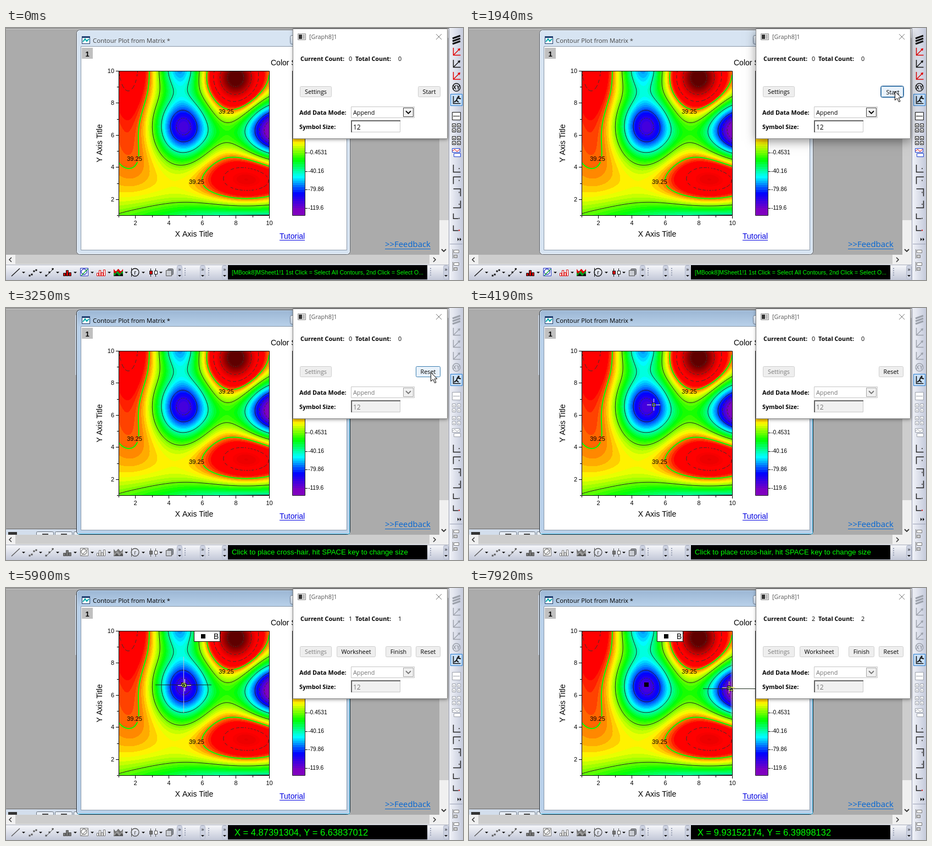
An HTML page with a canvas that plays this animation: 832 by 459 pixels, repeating every 8000 ms.

```html
<!DOCTYPE html>
<html lang="en">
<head>
<meta charset="utf-8">
<title>Contour picking</title>
<style>
html, body { margin: 0; width: 100%; height: 100%; overflow: hidden; background: #ababab; }
canvas { display: block; }
</style>
</head>
<body>
<canvas id="stage" width="832" height="459"></canvas>
<script>
const LOOP = 8000;
const ctx = document.getElementById('stage').getContext('2d');
const UI = '"Open Sans", "Noto Sans", sans-serif';
const ARIAL = '"Liberation Sans", Arial, sans-serif';
const clamp = (v, lo, hi) => Math.min(hi, Math.max(lo, v));

// ---------- drawing helpers ----------
function rect(x, y, w, h, fill, stroke, radius = 0) {
  const inset = stroke ? 0.5 : 0;
  ctx.beginPath();
  ctx.roundRect(x + inset, y + inset, w - 2 * inset, h - 2 * inset, radius);
  if (fill) { ctx.fillStyle = fill; ctx.fill(); }
  if (stroke) { ctx.strokeStyle = stroke; ctx.lineWidth = 1; ctx.stroke(); }
}
function path(p) {
  ctx.beginPath();
  for (let i = 0; i < p.length; i += 2) ctx.lineTo(p[i], p[i + 1]);
}
function line(color, width, ...p) {
  path(p);
  ctx.strokeStyle = color;
  ctx.lineWidth = width;
  ctx.stroke();
}
function poly(fill, ...p) {
  path(p);
  ctx.fillStyle = fill;
  ctx.fill();
}
function circle(x, y, r, color) {
  ctx.beginPath();
  ctx.arc(x, y, r, 0, 7);
  ctx.strokeStyle = color;
  ctx.lineWidth = 1.3;
  ctx.stroke();
}
const dot = (color, size, x, y) => rect(x - size / 2, y - size / 2, size, size, color);
const chevron = (color, x, y, r) => line(color, 1.8, x - r, y - r / 2, x, y + r / 2, x + r, y - r / 2);
function text(str, x, y, size, color = '#000', font = UI, align = 'left', weight = '') {
  ctx.font = `${weight} ${size}px ${font}`;
  ctx.textAlign = align;
  ctx.fillStyle = color;
  ctx.fillText(str, x, y);
}
function gradient(x0, y0, x1, y1, from, to) {
  const g = ctx.createLinearGradient(x0, y0, x1, y1);
  g.addColorStop(0, from);
  g.addColorStop(1, to);
  return g;
}

// ---------- contour plot ----------
const PLOT = { x: 205, y: 78, w: 274, h: 263 };
const LEVEL_STEP = 39.7, LEVEL_BASE = -0.4531;
const axisX = v => PLOT.x + (v - 1) / 9 * PLOT.w;
const axisY = v => PLOT.y + (10 - v) / 9 * PLOT.h;

// Smooth hills and pits in axis units: height, centre, spread.
const bump = (h, x, y, sx, sy) => ({ h, x, y, sx, sy });
const bumps = [
  bump(-130, 4.85, 6.5, 1.6, 1.9),
  bump(-170, 10.5, 6.3, 1.85, 1.7),
  bump(-88, 4.65, 10.3, 1.2, 1.7),
  bump(155, 8, 9.55, 1.4, 1.6),
  bump(70, 1.6, 10.3, 1.27, 3.3),
  bump(86, 8.7, 3.25, 2.35, 1.38),
  bump(19, 1.7, 4.9, 1.8, 2.4),
  bump(-15, 7.4, 6.1, 1.5, 1),
  bump(-78, 9, 0.5, 8, 1.38)
];
function field(px, py) {
  const x = 1 + px / PLOT.w * 9, y = 10 - py / PLOT.h * 9;
  return bumps.reduce((sum, b) =>
    sum + b.h * Math.exp(-(((x - b.x) / b.sx) ** 2) - ((y - b.y) / b.sy) ** 2), 22);
}

// Evenly spaced rainbow from purple to dark red.
const rainbow = [[128, 0, 192], [0, 0, 255], [0, 255, 255], [0, 255, 0], [255, 255, 0],
  [255, 0, 0], [255, 0, 0], [190, 0, 0], [95, 0, 0]];
function colorOf(value) {
  const band = LEVEL_STEP / 8;
  const v = LEVEL_BASE + (Math.floor((value - LEVEL_BASE) / band) + 0.5) * band;
  const k = clamp((v + 124) / 36, 0, rainbow.length - 1.001), i = Math.floor(k);
  return rainbow[i].map((c, n) => Math.round(c + (rainbow[i + 1][n] - c) * (k - i)));
}

const contourLabels = [[234, 238], [347, 280], [401, 152]];
const nearLabel = (x, y) =>
  contourLabels.some(([lx, ly]) => Math.abs(x - lx) < 14 && Math.abs(y - ly) < 6);

// Dashes follow the angle around the nearest hill or pit.
function inDash(x, y) {
  const offsets = bumps.map(b => [x - axisX(b.x), y - axisY(b.y)]);
  const [dx, dy] = offsets.reduce((a, b) => Math.hypot(...b) < Math.hypot(...a) ? b : a);
  return Math.sin(Math.atan2(dy, dx) * 24) > -0.4;
}

function makePlot() {
  const cv = document.createElement('canvas');
  cv.width = PLOT.w;
  cv.height = PLOT.h;
  const c = cv.getContext('2d');
  const img = c.createImageData(PLOT.w, PLOT.h);
  for (let y = 0, k = 0; y < PLOT.h; y++)
    for (let x = 0; x < PLOT.w; x++, k += 4)
      img.data.set([...colorOf(field(x, y)), 255], k);
  c.putImageData(img, 0, 0);

  const cell = 2, cols = PLOT.w / cell, rows = Math.ceil(PLOT.h / cell);
  const z = Array.from({ length: rows + 1 }, (_, r) =>
    Array.from({ length: cols + 1 }, (_, q) => field(q * cell, r * cell)));

  function contour(level, color, width, skip) {
    c.beginPath();
    for (let r = 0; r < rows; r++) for (let q = 0; q < cols; q++) {
      const x = q * cell, y = r * cell;
      const corners = [[x, y, z[r][q]], [x + cell, y, z[r][q + 1]],
        [x + cell, y + cell, z[r + 1][q + 1]], [x, y + cell, z[r + 1][q]]];
      const hits = [];
      corners.forEach((a, i) => {
        const b = corners[(i + 1) % 4];
        if ((a[2] < level) === (b[2] < level)) return;
        const t = (level - a[2]) / (b[2] - a[2]);
        hits.push([a[0] + (b[0] - a[0]) * t, a[1] + (b[1] - a[1]) * t]);
      });
      if (!hits.length || skip && skip(x + PLOT.x, y + PLOT.y)) continue;
      hits.forEach((h, i) => i % 2 ? c.lineTo(...h) : c.moveTo(...h));
    }
    c.strokeStyle = color;
    c.lineWidth = width;
    c.stroke();
  }
  const level = n => LEVEL_BASE + n * LEVEL_STEP;
  for (let n = -2; n <= 0; n++) contour(level(n), '#222', 1);
  for (const n of [-3, -2.5, 2, 3, 4]) contour(level(n), '#40302c', 1, (x, y) => !inDash(x, y));
  contour(level(1), '#00ff00', 2, nearLabel);
  return cv;
}
const plot = makePlot();

function drawGraph(s) {
  rect(138, 36, 20, 20, '#c0c0c0');
  text('1', 148, 52, 13, '#000', ARIAL, 'center', 'bold');
  ctx.drawImage(plot, PLOT.x, PLOT.y);
  rect(PLOT.x, PLOT.y, PLOT.w + 1, PLOT.h + 1, null, '#000');
  for (let v = 1; v <= 10; v++) {
    const x = Math.round(axisX(v)) + 0.5, y = Math.round(axisY(v)) + 0.5;
    const len = v % 2 ? 3 : 5;
    line('#000', 1, x, 342, x, 342 + len);
    line('#000', 1, 205, y, 205 - len, y);
    if (v % 2) continue;
    text(v, x, 359, 11, '#000', ARIAL, 'center');
    text(v, 197, y + 3, 11, '#000', ARIAL, 'right');
  }
  for (const [x, y] of contourLabels) text('39.25', x, y + 4, 11, '#000', ARIAL, 'center');
  text('X Axis Title', 342.5, 380, 14, '#000', ARIAL, 'center');
  ctx.save();
  ctx.translate(175, 210);
  ctx.rotate(-Math.PI / 2);
  text('Y Axis Title', 0, 0, 14, '#000', ARIAL, 'center');
  ctx.restore();

  text('Color Scale', 482, 68, 14, '#000', ARIAL);
  for (let y = 78; y < 341; y++) rect(521, y, 24, 1, `rgb(${colorOf(LEVEL_BASE + (227 - y) / 33.5 * LEVEL_STEP)})`);
  rect(521, 78, 24, 264, null, '#222');
  ['-0.4531', '-40.16', '-79.86', '-119.6'].forEach((label, i) => {
    const y = Math.round(227 + i * 33.6);
    line('#000', 1, 545, y + 0.5, 549, y + 0.5);
    text(label, 550, y + 3, 10.2, '#000', ARIAL);
  });
  text('Tutorial', 498, 384, 14, '#0000e0', ARIAL);
  line('#0000e0', 1, 498, 386.5, 544, 386.5);

  if (s.count) {
    rect(342, 78, 48, 20, '#fff', '#000');
    dot('#000', 8, 359, 88);
    text('B', 378, 93, 14, '#000', ARIAL);
    dot('#000', 8, 323, 176);
  }
  if (s.count > 1) dot('#000', 8, 477, 184);
  if (s.hair) drawHair(...s.hair);
}

function drawHair(x, y) {
  line('#1c2b1c', 1, x - 51, y + 0.5, x + 51, y + 0.5);
  line('#b9c4cc', 1, x + 0.5, y - 51, x + 0.5, y + 51);
  rect(x - 3, y - 3, 7, 7, null, '#d8e060');
  line('#111', 1, x - 2, y - 2, x + 3, y + 3);
  line('#111', 1, x - 2, y + 3, x + 3, y - 2);
}

// ---------- windows ----------
function drawGraphWindow(s) {
  if (s.active) {
    rect(-4, 402, 140, 14, '#d3deec', '#666', 5);
    rect(4, 408, 16, 6, '#333');
    for (let x = 55; x < 130; x += 34) {
      rect(x, 407, 32, 9, '#e8eef6', '#68717d', 2);
      line('#444', 2, x + 11, 412, x + 22, 412);
    }
    rect(126, 13, 6, 109, '#c3cedb');
  }
  rect(128, 3, 499, 410, s.active ? gradient(0, 3, 0, 34, '#9ab5d3', '#b9d1ea') : '#d7e4f2',
    s.active ? '#1f2833' : '#5b626b', 6);
  rect(129, 4, 497, 408, null, s.active ? '#dcebf9' : '#f2f7fc', 5);
  if (s.active) line('#4fc6ee', 1, 625.5, 10, 625.5, 411.5, 130, 411.5);
  rect(517, 13, 30, 17, gradient(0, 13, 0, 30, '#f6f9fd', '#c5d5e7'), '#6b7c92', 3);
  rect(138, 15, 15, 14, '#1d3d70');
  rect(139, 18, 13, 10, '#f4fbff');
  line('#0aa', 2, 140, 25, 144, 20, 147, 24, 151, 20);
  text('Contour Plot from Matrix *', 158, 27, 11.3, s.active ? '#000' : '#444');
  rect(136, 33, 485, 372, '#fff', '#8897a8');
  drawGraph(s);
}

function button(label, x, w, { hover, down, disabled } = {}) {
  rect(x, 106, w, 20, hover ? '#e9f2fb' : '#eeeeee', hover ? '#3c7fb1' : '#cfcfcf', 2);
  if (down) rect(x - 1, 105, w + 2, 22, null, '#3c6ea0', 3);
  const shift = down ? 1 : 0;
  text(label, x + w / 2 + shift, 120 + shift, 10.8, disabled ? '#7c7c7c' : '#000', UI, 'center');
}

function drawDialog(s) {
  ctx.save();
  ctx.shadowColor = 'rgba(0,0,0,.45)';
  ctx.shadowBlur = s.dialogActive ? 18 : 6;
  ctx.shadowOffsetY = s.dialogActive ? 4 : 1;
  rect(523, 1, 281, 201, '#fff');
  ctx.restore();
  rect(522, 1, 282, 201, '#fff', '#8a8a8a');
  rect(531, 10, 15, 12, '#f4f4f4', '#888');
  rect(533, 12, 6, 8, '#333');
  rect(540, 12, 4, 8, '#bbb');
  text('[Graph8]1', 552, 20, 10.8, '#555');
  line('#777', 1, 783, 11, 793, 21);
  line('#777', 1, 783, 21, 793, 11);

  const bold = (str, x, y) => text(str, x, y, 10.8, '#000', UI, 'left', 'bold');
  bold('Current Count:', 536, 60);
  bold('Total Count:', 636, 60);
  for (const x of [627, 717]) text(s.count, x, 60, 10.8, '#000', UI, 'center');

  button('Settings', 535, 58, { disabled: s.picking });
  if (s.count) {
    button('Worksheet', 602, 71);
    button('Finish', 691, 47);
  }
  if (s.picking) button('Reset', 746, 45, s);
  else button('Start', 750, 41, s);

  const ink = s.picking ? '#757575' : '#000';
  bold('Add Data Mode:', 534, 158);
  rect(628, 143, 116, 21, '#fff', '#c6c6c6');
  text('Append', 632, 158, 10.8, ink);
  rect(723, 145, 19, 17, '#f0f0f0', s.picking ? '#a6a6a6' : '#444');
  chevron(ink, 732.5, 153.5, 4.5);
  bold('Symbol Size:', 534, 184);
  rect(628, 168, 90, 22, s.picking ? '#f0f0f0' : '#fff', '#c8c8c8');
  line('#666', 2, 629, 190, 629, 169, 718, 169);
  text('12', 632, 185, 12, ink);
}

// ---------- toolbars ----------
const axes = (color, y, r = 7) => line(color, 1.5, 814.5, y - r, 814.5, y + r - 0.5, 814.5 + 2 * r - 1, y + r - 0.5);

function drawRightBar(s) {
  rect(806, 0, 26, 459, gradient(806, 0, 832, 0, '#f3f5fa', '#c5cadb'));
  line('#9aa0b4', 1, 806.5, 0, 806.5, 459);
  const pick = c => s.greyed ? '#9ca1ab' : c;
  const black = pick('#111'), red = pick('#e00000'), blue = pick('#1c3fd0');
  for (let y = 19; y < 30; y += 5) line(black, 3, 813, y, 827, y - 5);
  [red, black, red].forEach((color, i) => {
    const y = 43 + i * 22;
    axes(color, y);
    line(color, 1.5, 815, y + 6, 826, y - 5);
    poly(color, 827, y - 6, 826, y - 1, 822, y - 5);
  });
  circle(820, 108, 7, black);
  text('XY', 820, 112, 10, black, ARIAL, 'center', 'bold');

  rect(809, 120, 22, 22, '#c9e0f7', '#2a7fd4');
  axes('#111', 131);
  line('#111', 2, 816, 135, 820, 132, 822, 127, 828, 129);
  line('#111', 2, 820, 132, 824, 135);
  dot('#111', 3, 824, 125);

  rect(812, 153, 16, 15, '#fff', black);
  line(black, 1, 814, 160.5, 826, 160.5);
  for (const y of [182, 205]) for (let i = 0; i < 4; i++) {
    const x = 812 + (i % 2) * 9, top = y - 8 + (i >> 1) * 9;
    rect(x, top, 7, 7, '#fff', black);
    dot(black, 2, x + 3.5, top + 4);
  }
  rect(812, 219, 15, 8, '#fff', blue);
  line(red, 1, 813, 224, 817, 221, 821, 225, 826, 221);
  rect(815, 228, 13, 7, '#fff', blue);

  for (let i = 0; i < 6; i++) {
    const y = 256 + i * 21.7, small = i > 3;
    ctx.save();
    if (!small) {
      ctx.translate(821, y);
      ctx.rotate(i * Math.PI / 2);
      ctx.translate(-821, -y);
    }
    axes('#222', y, small ? 5 : 7);
    ctx.restore();
    dot(i === 5 ? '#d00' : '#555', 2, 825, y + (small ? 4 : 0));
  }
  for (const x of [822, 826]) poly('#111', x, 382, x + 3, 385, x, 388);
  line('#9aa0b4', 1, 808, 393.5, 831, 393.5);
  for (const y of [411, 434]) {
    rect(815, y - 7, 10, 6, '#fff', '#777');
    rect(815, y + 2, 7, 6, '#ccc', '#777');
    line('#777', 1, 813.5, y - 8, 813.5, y + 9);
  }
}

function drawBottomBar(s) {
  rect(0, 413, 806, 18, '#f0f0f0');
  rect(17, 413, 754, 17, '#cdcdcd');
  line('#333', 1.5, 10, 418, 6, 422, 10, 426);
  line('#333', 1.5, 778, 418, 782, 422, 778, 426);
  rect(0, 431, 832, 28, gradient(0, 431, 0, 459, '#f7f8fb', '#c3c8d8'));
  line('#a9aebd', 1, 0, 431.5, 806, 431.5);
  const pick = (c, grey) => s.greyed ? grey : c;
  const black = pick('#111', '#555'), red = pick('#d80000', '#777');
  const green = pick('#00a020', '#999'), blue = pick('#2030c0', '#777');
  const icons = [
    x => line(black, 1.2, x - 7, 452, x + 8, 438),
    x => { for (let i = 0; i < 4; i++) dot(black, 3, x - 5 + i * 4, 451 - i * 4 + (i % 2) * 2); },
    x => {
      line(black, 1, x - 6, 452, x + 8, 438);
      for (let i = -1; i < 2; i++) dot(black, 3, x + i * 6, 445 - i * 6);
    },
    x => { for (let i = 0; i < 3; i++) rect(x - 7 + i * 5, 446 - i * 5 % 9, 5, 6 + i * 5 % 9, red, black); },
    x => {
      rect(x - 7, 437, 15, 15, '#fff', blue);
      circle(x, 444, 5, blue);
      line(green, 1.2, x - 5, 451, x + 7, 439);
    },
    x => { for (let i = 0; i < 4; i++) rect(x - 8 + i * 4, 446 - i * 5 % 9, 4, 6 + i * 5 % 9, '#fff', red); },
    x => [red, green, black].forEach((color, layer) => {
      for (let i = -8; i < 9; i++) {
        const top = 441 + layer * 4 - 2 * Math.cos(i * 0.7 + layer);
        rect(x + i, top, 1, 452 - top, color);
      }
    }),
    x => {
      circle(x, 445, 7, black);
      text('r', x, 449, 11, black, ARIAL, 'center');
      line(black, 1, x - 6.5, 437, x - 6.5, 453);
    },
    x => [[-4, red], [5, '#fff']].forEach(([dx, fill]) => {
      line(black, 1, x + dx + 0.5, 438, x + dx + 0.5, 453);
      rect(x + dx - 2, 442, 6, 7, fill, black);
    }),
    x => {
      rect(x - 4, 438, 11, 12, '#8a8f98', '#666', 2);
      rect(x - 7, 441, 11, 11, '#c9ccd2', '#555');
    }
  ];
  icons.forEach((icon, i) => {
    const x = Math.round(17 + i * 31.2);
    icon(x);
    if (i < 9) poly('#111', x + 12, 444, x + 18, 444, x + 15, 447);
  });
  for (const x of [316, 358, 398, 801, 826]) {
    rect(x - 5, 432, 10, 26, '#ccd1e0', '#b4bacb', 3);
    text('»', x, 443, 9, '#111', ARIAL, 'center');
    poly('#111', x - 3, 450, x + 3, 450, x, 453);
  }
  for (const x of [326, 369, 773]) for (let y = 438; y < 454; y += 4) dot('#9aa1b5', 2, x, y);
  rect(404, 432, 363, 26, '#000');
  const [message, x, size] = s.status;
  text(message, x, 445 + size * 0.34, size, '#00ff00', ARIAL);
}

function drawDesktop() {
  rect(0, 0, 832, 459, '#ababab');
  line('#696969', 1, 0, 0.5, 806, 0.5);
  line('#dcdcdc', 1, 0, 1.5, 806, 1.5);
  rect(789, 2, 17, 411, '#f0f0f0');
  rect(789, 18, 17, 332, '#cdcdcd');
  chevron('#333', 797, 405, 4);
  text('>>Feedback', 690, 399, 14.9, '#0066d6');
  line('#0066d6', 1, 690, 402.5, 773, 402.5);
}

// ---------- pointers ----------
function drawArrow(x, y) {
  const outline = [0, 0, 0, 16, 4, 12.5, 7, 19, 9.5, 18, 6.7, 11.5, 11.5, 11.5, 0, 0];
  ctx.save();
  ctx.translate(x + 0.5, y + 0.5);
  poly('#fff', ...outline);
  line('#000', 1, ...outline);
  ctx.restore();
}
function drawCross(x, y, color) {
  for (const d of [-1, 1]) {
    line(color, 1, x + d * 4, y + 0.5, x + d * 12, y + 0.5);
    line(color, 1, x + 0.5, y + d * 4, x + 0.5, y + d * 11);
  }
  rect(x - 3, y - 3, 7, 7, null, '#111');
  rect(x - 2, y - 2, 5, 5, null, '#9be05a');
}

// ---------- timeline ----------
function glide(t, start, end, steps, from, to) {
  const n = steps - 1;
  const k = clamp(Math.floor((t - start) / (end - start) * n + 1e-6) / n, 0, 1);
  const e = k * k * (3 - 2 * k);
  return from.map((a, i) => Math.round(a + (to[i] - a) * e));
}
function pointerAt(t) {
  if (t < 380) return null;
  if (t < 3250) return glide(t, 380, 1080, 10, [764, 409], [775, 115]);
  if (t < 4340) return glide(t, 3430, 4260, 12, [773, 117], [326, 177]);
  if (t < 4570) return [327, 177];
  if (t < 5900) return [323, 177];
  if (t < 7920) return glide(t, 5900, 6510, 9, [325, 177], [477, 183]);
  return [473, 181];
}
function statusAt(t) {
  if (t < 2710) return ['[MBook8]MSheet1!1 1st Click = Select All Contours, 2nd Click = Select O...', 411, 10.5];
  if (t < 5270) return ['Click to place cross-hair, hit SPACE key to change size', 411, 13.2];
  return [t < 7210 ? 'X = 4.87391304, Y = 6.63837012' : 'X = 9.93152174, Y = 6.39898132', 416, 16.5];
}

function draw(t) {
  const pointer = pointerAt(t);
  const state = {
    active: t >= 2330,
    dialogActive: t >= 1460 && t < 2330,
    down: t >= 1460 && t < 2710,
    hover: t < 3600 && !!pointer && pointer[1] < 126,
    picking: t >= 2710,
    greyed: t >= 2950,
    count: t < 5670 ? 0 : t < 7670 ? 1 : 2,
    hair: t < 5270 ? null : t < 7210 ? [323, 176] : [477, 183],
    status: statusAt(t)
  };
  drawDesktop();
  drawGraphWindow(state);
  drawBottomBar(state);
  drawRightBar(state);
  drawDialog(state);
  if (!pointer) return;
  if (pointer[0] > 523) drawArrow(...pointer);
  else if (t < 5270 || t >= 5900) drawCross(...pointer, t < 7920 ? '#f4f4f4' : '#e4ee60');
}

const startTime = performance.now();
function tick() {
  draw((performance.now() - startTime) % LOOP);
  requestAnimationFrame(tick);
}
tick();
</script>
</body>
</html>
```
